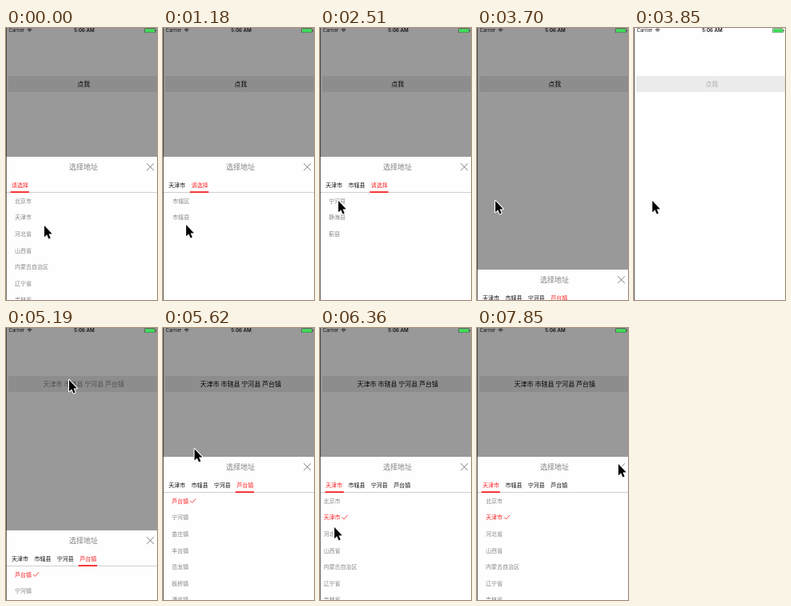
An HTML page with a canvas that plays this animation: 189x340 px, repeating every 8 s.

```html
<!DOCTYPE html>
<html lang="zh-CN">
<head>
<meta charset="utf-8">
<title>选择地址</title>
<style>
html, body { margin: 0; width: 100%; height: 100%; overflow: hidden; background: #fff; }
canvas { display: block; width: 189px; height: 340px; }
</style>
</head>
<body>
<canvas id="stage"></canvas>
<script>
const W = 189, H = 340, LOOP = 8000;
const STEP = 148;          // the screen is sampled at this interval (ms)
const SHEET = 161;         // top of the open sheet
const ROW = 20.6, TAB = 28.4;
const CJK = '"Noto Sans CJK SC", "Noto Sans CJK", "Noto Sans CJK JP", sans-serif';
const LATIN = 'Inter, Roboto, sans-serif';
const RED = '#fb2225', GRAY = '#858585', INK = '#111', PAPER = '#fefefe';

const canvas = document.getElementById('stage');
const ctx = canvas.getContext('2d');
const dpr = window.devicePixelRatio || 1;
canvas.width = Math.round(W * dpr);
canvas.height = Math.round(H * dpr);

const picked = ['天津市', '市辖县', '宁河县', '芦台镇'];
const lists = [
  ['北京市', '天津市', '河北省', '山西省', '内蒙古自治区', '辽宁省', '吉林省'],
  ['市辖区', '市辖县'],
  ['宁河县', '静海县', '蓟县'],
  ['芦台镇', '宁河镇', '苗庄镇', '丰台镇', '岳龙镇', '板桥镇', '潘庄镇']
];

// All times below are in steps
const picks = [5.6, 13.6, 18.88, 24.3];
const closed = 26, reopen = 34.7, back = 41;
const moves = [
  { from: 0, to: 3, x: 28, y: 245 },
  { from: 9, to: 12, x: 26, y: 238 },
  { from: 15, to: 17, x: 22, y: 215 },
  { from: 27, to: 33, x: 78, y: 64 },
  { from: 35, to: 40, x: 17, y: 197 },
  { from: 42, to: 43, x: 17, y: 248 },
  { from: 43, to: 45, x: 27, y: 256 },
  { from: 46, to: 53, x: 176, y: 169 }
];

const clamp = v => Math.min(1, Math.max(0, v));
const smooth = p => p * p * (3 - 2 * p);
// Spring-like approach from 0 to 1, beginning at the given time
const settle = (n, start) => n < start ? 0 : 1 - Math.exp(-2.23 * (n - start));

function pointerAt(n) {
  let x = 47, y = 246;
  for (const m of moves) {
    const e = smooth(clamp((n - m.from) / (m.to - m.from)));
    x += (m.x - x) * e;
    y += (m.y - y) * e;
  }
  return [x, y];
}

function pageAt(n) {
  const forward = picks.slice(0, 3).reduce((sum, t) => sum + settle(n, t), 0);
  return forward - 3 * settle(n, back);
}

function sheetAt(n) {
  const hidden = n < closed ? settle(n, picks[3]) : 1 - settle(n, reopen);
  return Math.round(SHEET + (H - SHEET) * hidden);
}

function rect(x, y, w, h, color) {
  ctx.fillStyle = color;
  ctx.fillRect(x, y, w, h);
}

function text(s, x, cy, size, color, align = 'left', family = CJK, weight = 400) {
  ctx.font = `${weight} ${size}px ${family}`;
  ctx.textAlign = align;
  ctx.fillStyle = color;
  ctx.fillText(s, x, cy + size * 0.37);
}

function trace(points) {
  ctx.beginPath();
  points.forEach(([x, y]) => ctx.lineTo(x, y));
}

function line(points, color, width) {
  trace(points);
  ctx.strokeStyle = color;
  ctx.lineWidth = width;
  ctx.stroke();
}

function drawStatus() {
  text('Carrier', 3.5, 3.2, 6, INK, 'left', LATIN);
  text('5:06 AM', 98, 3.2, 6.2, INK, 'center', LATIN, 600);
  ctx.strokeStyle = INK;
  ctx.lineWidth = 1;
  for (const r of [0.5, 2.2, 4]) {
    ctx.beginPath();
    ctx.arc(29.5, 5.2, r, -Math.PI * 0.75, -Math.PI * 0.25);
    ctx.stroke();
  }
  ctx.lineWidth = 0.4;
  ctx.strokeRect(173.8, 0.8, 12.8, 5);
  rect(174.2, 1.2, 12, 4.2, '#3fdc58');
  rect(187.2, 2.3, 0.8, 2, '#333');
}

function drawButton(n) {
  rect(3, 60, W - 3, 20, '#ebebeb');
  const changing = n === closed;
  const pressed = n >= reopen - 1 && n < reopen + 1;
  const alpha = changing ? 0.25 : pressed ? 0.43 : 0.97;
  text(n > closed ? picked.join(' ') : '点我', 97.3, 70, 8, `rgba(0,0,0,${alpha})`, 'center');
}

function drawList(items, choice, left, top) {
  items.forEach((name, i) => {
    const y = top + 55.3 + i * ROW;
    const on = name === choice;
    text(name, left + 11, y, 7, on ? RED : GRAY);
    if (on) line([[left + 34, y - 0.4], [left + 36.5, y + 2.1], [left + 41, y - 3]], RED, 0.85);
  });
}

function drawSheet(n) {
  const top = sheetAt(n), page = pageAt(n);
  const done = picks.filter(t => n >= t).length;
  const level = n > back ? 0 : Math.min(done, 3);
  const tabs = picked.slice(0, done);
  if (done < 4) tabs.push('请选择');

  rect(0, top, W, H - top, PAPER);
  text('选择地址', 97, top + 12.8, 9, '#828282', 'center');
  for (const d of [-4.4, 4.4]) {
    line([[180.6 - d, top + 8.3], [180.6 + d, top + 17.1]], '#5c5c5c', 0.8);
  }
  tabs.forEach((name, i) => text(name, 7 + i * TAB, top + 35.3, 7, i === level ? RED : INK));
  rect(0, top + 44.2, W, 0.8, '#c4c4c4');
  rect(5.5 + page * TAB, top + 43.2, 23.3, 1.8, RED);

  ctx.save();
  ctx.beginPath();
  ctx.rect(0, top + 45, W, H);
  ctx.clip();
  lists.forEach((items, i) => drawList(items, i < done ? picked[i] : '', (i - page) * W, top));
  ctx.restore();
}

function drawPointer(x, y) {
  ctx.save();
  ctx.translate(x + 1, y + 1);
  trace([[0, 0], [0, 14.2], [3.2, 11.2], [5.5, 16.4], [7.7, 15.4], [5.5, 10.4], [9.7, 10.2]]);
  ctx.closePath();
  ctx.lineJoin = 'round';
  ctx.strokeStyle = '#fff';
  ctx.lineWidth = 2.2;
  ctx.stroke();
  ctx.fillStyle = '#000';
  ctx.fill();
  ctx.restore();
}

function draw(ms) {
  const n = Math.min(53, Math.floor((ms % LOOP + 12) / STEP));
  const open = n < closed || n > reopen;
  ctx.setTransform(dpr, 0, 0, dpr, 0, 0);
  rect(0, 0, W, H, PAPER);
  drawButton(n);
  if (open) rect(0, 0, W, H, 'rgba(0,0,0,0.4)');
  drawStatus();
  if (open) drawSheet(n);
  rect(0, 0, 1, H, 'rgba(0,0,0,0.53)');
  drawPointer(...pointerAt(n));
}

let start = null;
function tick(now) {
  if (start === null) start = now;
  draw(now - start);
  requestAnimationFrame(tick);
}
requestAnimationFrame(tick);
</script>
</body>
</html>
```
